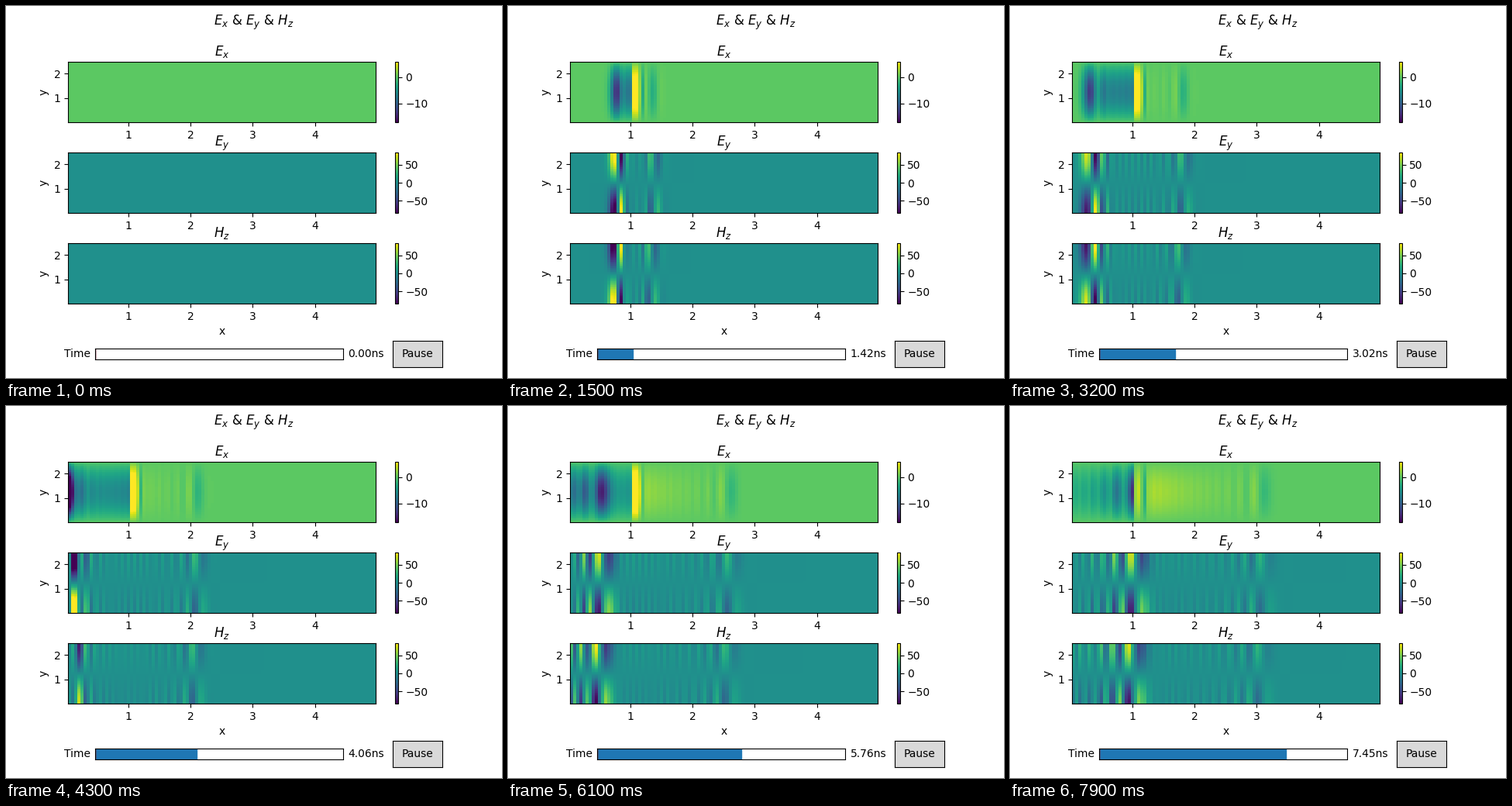
Animation, 640 px wide and 480 px high, one loop 8 s. Source, as a matplotlib script:

```python
import numpy as np
import matplotlib.pyplot as plt
from matplotlib.animation import FuncAnimation

FRAMES = 80
NX, NY = 100, 50
H = 0.05                             # cell size in m
R = 0.8 / np.sqrt(2)                 # Courant number
DT = R * H / 0.299792458             # time step in ns
K = 2 * np.sin(np.pi / (2 * NY))     # discrete transverse wavenumber

# Electric and magnetic source strength by column
J = {20: -285, 22: 105, 23: 90, 24: -50}
M = {20: 285, 21: -52, 22: -98, 23: -20, 24: 25}
PEAK, WIDTH = 3.5, 1.8               # source pulse in steps


def simulate():
    """Leapfrog for the first waveguide mode between conducting walls."""
    ex, ey, hz = np.zeros(NX), np.zeros(NX + 1), np.zeros(NX)
    states = [(ex.copy(), ey.copy(), hz.copy())]
    for n in range(1, FRAMES):
        g = np.exp(-((n - PEAK) / WIDTH) ** 2 / 2) / (WIDTH * np.sqrt(2 * np.pi))
        hz += R * (K * ex - np.diff(ey))
        for i, s in M.items():
            hz[i] += s * g
        ex -= R * K * hz
        ey[1:-1] -= R * np.diff(hz)
        for i, s in J.items():
            ey[i] += s * g
        states.append((ex.copy(), ey.copy(), hz.copy()))
    return states


states = simulate()
rows = np.arange(1, NY)
sin_y = np.sin(np.pi * rows / NY)
cos_y = np.cos(np.pi * (rows + 0.5) / NY)
profiles = (sin_y, cos_y, cos_y)

fig, axes = plt.subplots(3, 1, figsize=(6.4, 4.8), dpi=100)
fig.subplots_adjust(left=0.125, right=0.9, bottom=0.2, top=0.85, hspace=0.5)
fig.suptitle("$E_x$ & $E_y$ & $H_z$")

panels = [
    ("$E_x$", -17.2, 5.8, [-10, 0]),
    ("$E_y$", -83, 83, [-50, 0, 50]),
    ("$H_z$", -83, 83, [-50, 0, 50]),
]
extent = (H / 2, (NX - 0.5) * H, H / 2, (NY - 0.5) * H)
images = []
for ax, (name, low, high, ticks) in zip(axes, panels):
    im = ax.imshow(np.zeros((NY - 1, NX - 1)), origin="lower", aspect="auto",
                   extent=extent, interpolation="nearest", cmap="viridis",
                   vmin=low, vmax=high)
    ax.set_title(name)
    ax.set_ylabel("y")
    ax.set_xticks([1, 2, 3, 4])
    ax.set_yticks([1, 2])
    fig.colorbar(im, ax=ax, ticks=ticks)
    images.append(im)
axes[-1].set_xlabel("x")


def widget_axes(rect, color):
    ax = fig.add_axes(rect, facecolor=color)
    ax.set(xticks=[], yticks=[], xlim=(0, 1), ylim=(0, 1))
    return ax


slider = widget_axes([0.18, 0.05, 0.5, 0.03], "white")
bar = plt.Rectangle((0, 0), 0, 1, color="C0")
slider.add_patch(bar)
slider.axvline(0, color="r", lw=1)
slider.text(-0.02, 0.5, "Time", ha="right", va="center")
clock = slider.text(1.02, 0.5, "", ha="left", va="center")

button = widget_axes([0.78, 0.03, 0.1, 0.07], "0.85")
button.text(0.5, 0.5, "Pause", ha="center", va="center")


def update(n):
    for im, field, profile in zip(images, states[n], profiles):
        im.set_data(np.outer(profile, field[:NX - 1]))
    bar.set_width(n / 105)
    clock.set_text(f"{n * DT:.2f}ns")
    return [*images, bar, clock]


anim = FuncAnimation(fig, update, frames=FRAMES, interval=100,
                     repeat=True, repeat_delay=0, blit=False)
plt.show()
```
